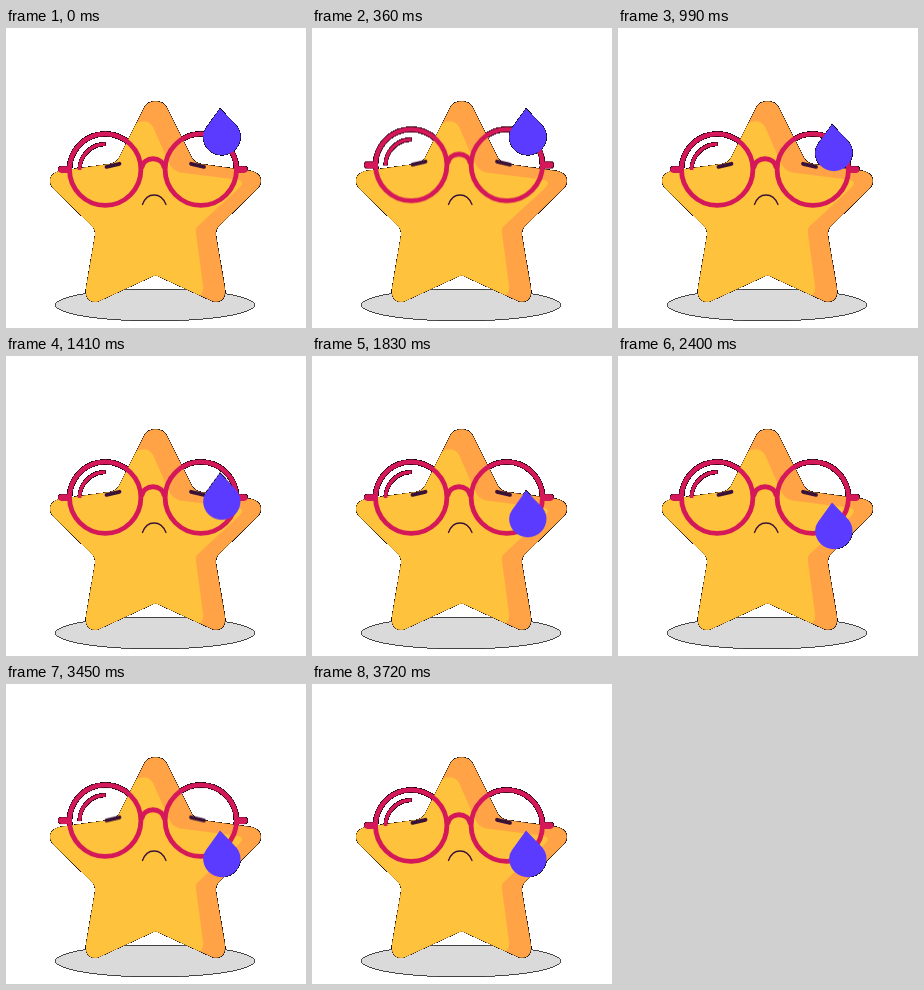
Write an HTML page that moves like this. It is 300 px wide and 300 px high and loops after 6.33 s.

```html
<!DOCTYPE html>
<html lang="en">
<head>
<meta charset="utf-8">
<title>Worried star</title>
<style>
  html, body { margin: 0; width: 100%; height: 100%; overflow: hidden; background: #fff; }
  svg { display: block; width: 100%; height: 100%; }

  .glasses, .eyes, .drop { animation: 6330ms linear infinite; }
  .glasses { --lift: -5px; animation-name: nudge; }
  .eyes { --lift: -2.5px; animation-name: nudge; }
  .drop { animation-name: slide; }

  .ring { stroke-width: calc(4.8px + var(--rim, 0px)); }
  .hinge { stroke-width: calc(6.6px + var(--rim, 0px)); }
  .shine { stroke-width: calc(3.6px + var(--rim, 0px)); }
  .rim { --rim: 1px; stroke: #000; shape-rendering: crispEdges; }

  /* lifts at 0 ms and 3150 ms, each 570 ms long */
  @keyframes nudge {
    0%, 49.763% { transform: none; animation-timing-function: cubic-bezier(.39, .575, .565, 1); }
    4.502%, 54.265% { transform: translateY(var(--lift)); animation-timing-function: cubic-bezier(.47, 0, .745, .715); }
    9.005%, 58.768%, 100% { transform: none; }
  }
  /* runs down from 660 ms to 2400 ms, then rests */
  @keyframes slide {
    0% { transform: none; }
    10.427% { transform: none; animation-timing-function: cubic-bezier(.167, .167, .667, 1); }
    37.915%, 100% { transform: translateY(66px); }
  }
</style>
</head>
<body>
<svg viewBox="0 0 300 300" fill="none">
  <defs>
    <path id="star" d="M138 80 C142 71 157 71 161 80 L186 130 Q189 135 195 136 L245 143
      C255 145 258 154 251 161 L213 198 Q209 202 210 208 L219 261 C220 271 214 276 206 273
      L154 249 Q149.500 246 145 249 L93 273 C85 276 79 271 80 261 L89 208 Q90 202 86 198
      L48 161 C41 154 44 145 54 143 L104 136 Q110 135 113 130 Z"/>
    <clipPath id="inside"><use href="#star"/></clipPath>
    <path id="tear" d="M214 80.500 L228 95 Q234.500 101 234.500 108.500 A18.700 18.700 0 0 1 197.100 108.500
      Q197.100 104 200 100 Z"/>
    <g id="frame">
      <circle class="ring" cx="99.200" cy="141.600" r="35.700"/>
      <circle class="ring" cx="194.800" cy="141.600" r="35.700"/>
      <path class="ring" d="M135.500 140.500 C137 127.500 157 127.500 158.500 140.500"/>
      <path class="hinge" stroke-linecap="round" d="M55.500 141.600 H62 M232.500 141.600 H238.200"/>
      <path class="shine" d="M73.500 142 A26 26 0 0 1 99.500 116"/>
    </g>
  </defs>

  <ellipse cx="149" cy="277" rx="99.500" ry="16" fill="#dadada" stroke="#000" stroke-width=".7" shape-rendering="crispEdges"/>

  <!-- dark edges, seen only against the white -->
  <g class="rim">
    <use class="glasses" href="#frame"/>
    <use class="drop" href="#tear"/>
    <use href="#star"/>
  </g>

  <use href="#star" fill="#ffa346"/>
  <path clip-path="url(#inside)" fill="#ffc23c" d="M128 97 C138 90 145 94 148 101 L162.500 134 Q166 142.500 174 144.500
    L230 151.500 Q240 153 233 160 L193 197 Q189 200 190 205 L197 258 Q198 267 190 270 L150 300 H20 V97 Z"/>

  <path class="eyes" stroke="#3a1238" stroke-width="3.800" stroke-linecap="round" d="M100.500 138.800 L113.500 135.800 M185 135.800 L198 138.800"/>
  <path stroke="#3a1238" stroke-width="1.300" stroke-linecap="round" d="M136.500 176.500 C141 163.800 155 163.800 160 176.500"/>

  <use class="glasses" href="#frame" stroke="#d4185a"/>
  <use class="drop" href="#tear" fill="#5b3bff"/>
</svg>
</body>
</html>
```
